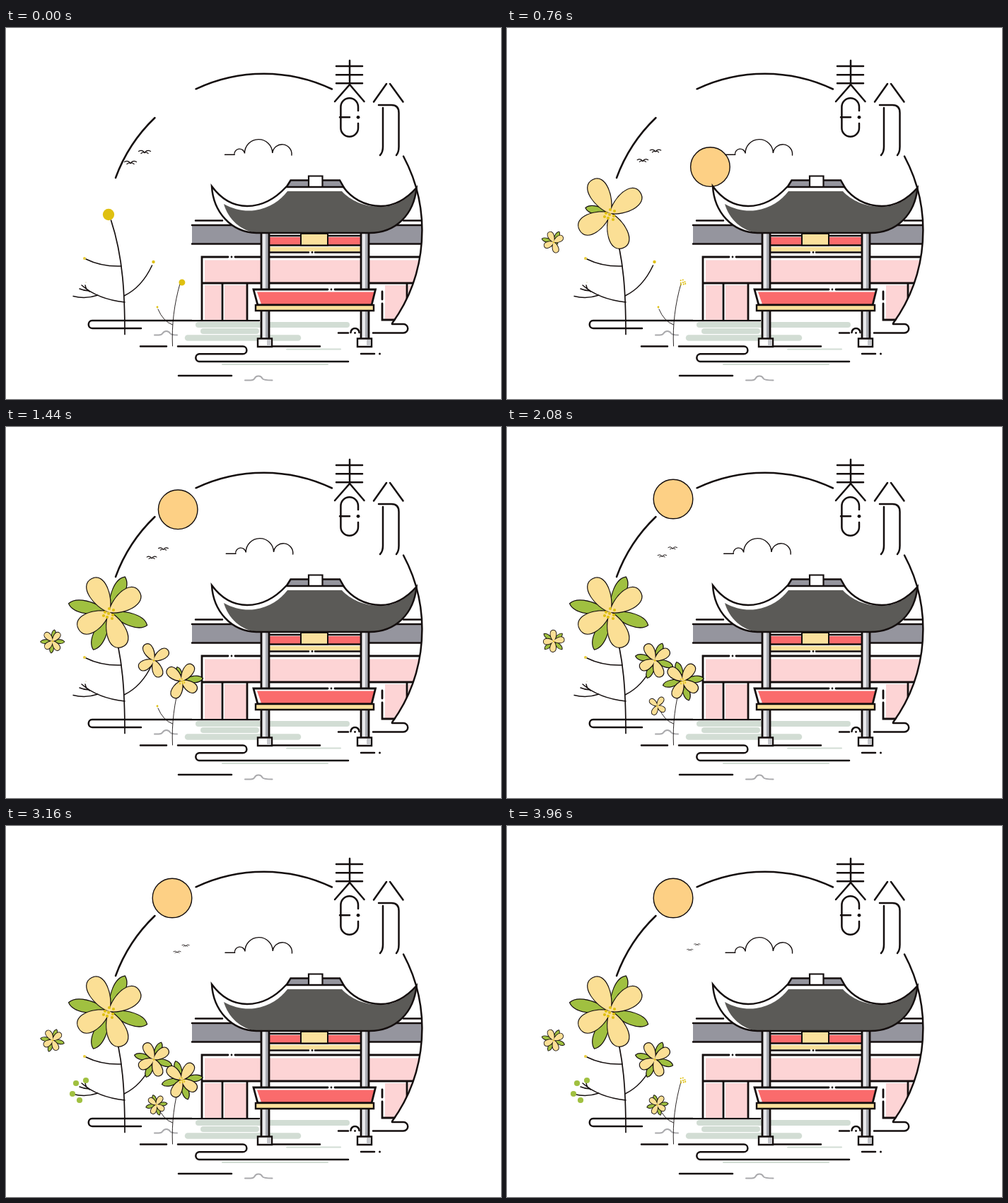
An HTML page with a canvas that plays this animation: 700x525 px, repeating every 4000 ms.

```html
<!DOCTYPE html>
<html lang="en">
<head>
<meta charset="utf-8">
<title>Spring pavilion</title>
<style>
html, body { margin: 0; width: 100%; height: 100%; overflow: hidden; background: #fff; }
canvas { display: block; width: 700px; height: 525px; }
</style>
</head>
<body>
<canvas id="stage" width="700" height="525"></canvas>
<script>
const ctx = document.getElementById('stage').getContext('2d');
const LOOP = 4000;
const INK = '#140e0e', PETAL = '#fbdf95', LEAF = '#a0c040', POLLEN = '#dfc010';
const SUN = '#fdd085', PINK = '#fdd4d5', RED = '#fa6b6c', CREAM = '#fbe19c';
const WALL = '#95959e', ROOF = '#5b5a57', MOSS = '#d2ddd4';
const RING = { x: 364.5, y: 288.5, r: 224 };
const BOLD = 2.8;

const clamp = v => Math.max(0, Math.min(1, v));
const mix = (a, b, p) => a + (b - a) * p;
const backOut = p => 1 + 2 * (p - 1) ** 3 + (p - 1) ** 2;
const pop = (t, start, dur) => t <= start ? 0 : backOut(clamp((t - start) / dur));
const sway = t => -Math.sin(t / 1600 * 2 * Math.PI);

function line(d, width = 2.5, color = INK) {
  ctx.lineWidth = width;
  ctx.strokeStyle = color;
  ctx.stroke(new Path2D(d));
}
function fill(d, color) {
  ctx.fillStyle = color;
  ctx.fill(new Path2D(d));
}
function shape(d, color, width = 2.5) {
  fill(d, color);
  line(d, width);
}
function rect(x, y, w, h, color) {
  ctx.fillStyle = color;
  ctx.fillRect(x, y, w, h);
}
function dot(x, y, r, color) {
  if (r <= 0) return;
  ctx.fillStyle = color;
  ctx.beginPath();
  ctx.arc(x, y, r, 0, 7);
  ctx.fill();
}
function ringArc(x1, y1, x2, y2) {
  line(`M${x1} ${y1}A${RING.r} ${RING.r} 0 0 1 ${x2} ${y2}`);
}

// Sky
function cloud(t) {
  ctx.save();
  ctx.translate(3 * sway(t), 0);
  line('M309.5 179.3H323A7 7 0 0 1 337.5 177.5A19 19 0 0 1 376.8 177A13 13 0 0 1 404 180', 1.4);
  ctx.restore();
}
function sun(t) {
  const u = 1 - clamp(t / 1720), w = 0.18;
  const left = (u < w ? u * u / (2 * w) : u - w / 2) / (1 - w / 2);
  ctx.beginPath();
  ctx.arc(235 + 102 * left, 102 + 184 * left, 27.8, 0, 7);
  ctx.fillStyle = SUN;
  ctx.fill();
  ctx.lineWidth = 1.4;
  ctx.strokeStyle = INK;
  ctx.stroke();
}
function birds(t) {
  const p = t / LOOP, s = mix(1, 0.5, p);
  ctx.save();
  ctx.translate(mix(196, 269.5, p), mix(175.5, 167.5, p));
  ctx.scale(s, s);
  for (const [x, y] of [[0, 0], [-20, 15]]) {
    ctx.save();
    ctx.translate(x, y);
    line('M-8.5 -1Q-3.5 -4 0 1Q3.5 -4 8.5 -1M-5 2Q-2 -0.5 0 1Q2 -0.5 5 2', 1.3);
    ctx.restore();
  }
  ctx.restore();
}

function title() {
  line('M467 54H504M467 66.3H504M467 78.3H504M486 46V80L465 104M486 80L506.5 104');
  line('M498 117V111.5A12.3 12.3 0 0 0 473.4 111.5V141.5A12.3 12.3 0 0 0 498 141.5V135M472 126.3H486');
  dot(498, 126.3, 2.4, INK);
  line('M538 79L520 104.5M543 79L561.5 104.5M527 109H545Q555.5 109 555.5 120V168Q555.5 176 552 180M533 113V168Q533 176 529 180');
}

// Pavilion
const roofPath = 'M291 224C305 243 322 252 341 252C366 252 384 238 396 225H477C488 240 506 252 530 252C552 252 568 240 580.5 226C577 263 552 290 514 290H354C318 289 293 260 291 224Z';
const roofTiles = 'M308 249C322 257 338 260 352 258C373 255 388 244 398 231H475C487 244 506 253 530 253C552 253 568 241 580.5 226C577 263 552 290 514 290H356C332 288 314 270 308 249Z';

function walls() {
  ctx.save();
  ctx.beginPath();
  ctx.arc(RING.x, RING.y, RING.r, 0, 7);
  ctx.clip();
  rect(263, 272, 325, 141, '#fff');
  line('M268 272.5H306M562 272.5H590');
  rect(263, 279, 325, 26, WALL);
  line('M263 279H590M263 305.5H590');

  rect(366, 290, 142, 32, '#fff');
  rect(373, 296, 130, 11, RED);
  line('M366 294H508M366 307.5H508');
  rect(373, 310, 130, 6, CREAM);
  line('M366 317.5H428M437 317.5H508');
  dot(433, 317.5, 1.4, INK);
  shape('M417 291H455V307.5H417Z', CREAM, 2);

  rect(281, 328.5, 307, 32, PINK);
  rect(281, 364, 23, 49, PINK);
  rect(309, 364, 31, 49, PINK);
  rect(536, 364, 30, 49, PINK);
  rect(569, 364, 20, 49, PINK);
  line('M277 413V324H314M324 324H590M277 361H590M306 361V413M341 361V413M567 361V413M532 373V384M532 390V413H552', BOLD);
  dot(319, 324, 1.4, INK);
  ctx.restore();
}
function roof() {
  shape('M396 226L402.5 215.5H472L478 226Z', WALL);
  shape('M428 209.5H447.5V225H428Z', '#fff', 2.2);
  fill(roofPath, '#fff');
  fill(roofTiles, ROOF);
  line(roofPath);
}
function post(x) {
  rect(x, 290, 11, 150, '#e9e9ec');
  rect(x + 6, 290, 4, 150, '#a9abb2');
  line(`M${x} 291V440M${x + 11} 291V440`, BOLD);
  shape(`M${x - 5} 439.5H${x + 15}V451H${x - 5}Z`, '#fff', 2.4);
  rect(x + 8, 441, 5, 9, '#c5c6ca');
}
function bench() {
  fill('M350 370H522.5L517 392H356Z', '#fff');
  fill('M355 373.5H521L516 391H361Z', RED);
  line('M455 370H350L356 392H517L522.5 370H465', BOLD);
  dot(460, 370, 1.4, INK);
  shape('M353 392H520V400H353Z', CREAM, 2.4);
}

function ground() {
  line('M272 420H482', 8, MOSS);
  line('M279 429H354', 8, MOSS);
  line('M257 438.5H413', 8.5, MOSS);
  line('M397 454.5H473M306 476H455', 2, MOSS);
  line('M191 425H122C115 425 115 414 122 414H358');
  line('M546 419H562A6 6 0 0 1 562 431.5H519M470 431.5H484M487.5 431A6 6 0 0 1 499.5 431M503 431.5H513');
  dot(493.5, 431.5, 1.4, INK);
  line('M190 450.5H227M376 450.5H444M243 450.5H335A5.4 5.4 0 0 1 335 461.3H273A5.4 5.4 0 0 0 273 472H484M502 461H521M244 492H319');
  dot(528.5, 461, 1.5, INK);
  line('M210 434.5H216Q220 434.5 221.5 432A6 6 0 0 1 232 432Q233.5 434.5 242 434.5M338 498.5H346Q350 498.5 351.5 496A6 6 0 0 1 362.5 496Q364 498.5 376.5 498.5', 2, '#a9a9ac');
}

// Plants
function stems() {
  line('M168 433.5C168 380 166 325 148.5 272', 1.7);
  line('M163 337Q135 338 113 327M167 379Q192 367 206.5 336M168 388Q130 384 107 364M95 379.5Q113 384 130 378M104 369Q111 372 118 372M112 364Q113 370 118 373', 1.5);
  line('M235.5 450C234 420 238 390 246 362M235.5 420Q222 415 215 398', 0.9);
  dot(111, 326, 2, '#e8cc3c');
  dot(113, 360, 1, '#ece9d0');
  dot(208.5, 331, 2.2, POLLEN);
  dot(214, 395, 1.4, POLLEN);
}
function berries(t) {
  const spots = [[113, 360], [94, 379], [104, 388], [99, 364]];
  spots.forEach(([x, y], i) => dot(x, y, 4.1 * clamp((t - 2320 - i * 60) / 420), LEAF));
}

// Blades: angle in degrees and length, in order of growth
const petals = [[151, 49], [242, 53], [325, 51], [70, 52]];
const leaves = [[192, 58], [294, 54], [19, 56], [113, 57]];
const pollen = [[-6, 0], [0, -5], [6, -3], [-1, 2], [5, 4], [-8, 5], [-3, 7], [4, 9]];

function blades(list, outline, color, start, gap, t, size) {
  const path = new Path2D();
  list.forEach(([angle, len], i) => {
    const g = pop(t, start + i * gap, 200);
    if (g) path.addPath(new Path2D(outline(len)), new DOMMatrix().rotate(angle).scale(g));
  });
  ctx.lineWidth = (size < 0.4 ? 1.8 : 2.4) / size;
  ctx.strokeStyle = INK;
  ctx.stroke(path);
  ctx.fillStyle = color;
  ctx.fill(path);
}
const petalShape = l => `M0 0C${l * 0.3} -15 ${l} -21 ${l} 0C${l} 21 ${l * 0.3} 15 0 0Z`;
const leafShape = l => `M0 0C${l * 0.4} -10 ${l * 0.85} -12 ${l} 0C${l * 0.85} 12 ${l * 0.4} 10 0 0Z`;

function flower(t, f) {
  ctx.save();
  ctx.translate(f.x, f.y);
  ctx.rotate(f.turn || 0);
  ctx.scale(f.flip ? -f.size : f.size, f.size);
  if (t < (f.end || LOOP)) {
    blades(leaves, leafShape, LEAF, f.start + 480, 120, t, f.size);
    blades(petals, petalShape, PETAL, f.start, 90, t, f.size);
  }
  if (f.bud) {
    const open = clamp(t / 200);
    dot(-1, 2, f.bud / f.size * (1 - open), POLLEN);
    for (const [x, y] of pollen) dot(x, y, 2.1 * open, POLLEN);
  } else if (t > f.start) {
    dot(0, 1, 1.8 / Math.sqrt(f.size), POLLEN);
  }
  ctx.restore();
}

function draw(t) {
  rect(0, 0, 700, 525, '#fff');
  ctx.lineCap = 'round';
  ctx.lineJoin = 'miter';

  ringArc(155, 212, 210.5, 127);
  ringArc(268.5, 86.3, 461, 86.5);
  sun(t);
  cloud(t);
  birds(t);
  title();
  ground();
  walls();
  ringArc(562, 181.5, 546, 418);
  post(361);
  post(502);
  roof();
  bench();

  stems();
  berries(t);
  if (t > 0) flower(t, { x: 66, y: 303, size: 0.29, start: 20, turn: -sway(t) * 0.46 });
  flower(t, { x: 146, y: 262, size: 1, start: 242, bud: 8.2 });
  flower(t, { x: 209, y: 330, size: 0.47, start: 960 });
  flower(t, { x: 248.5, y: 359, size: 0.5, start: 790, bud: 4.5, flip: true, turn: 0.1, end: 3680 });
  flower(t, { x: 212.5, y: 394.5, size: 0.26, start: 1600, flip: true, turn: 0.1 });
}

const begin = performance.now();
function tick() {
  draw((performance.now() - begin) % LOOP);
  requestAnimationFrame(tick);
}
tick();
</script>
</body>
</html>
```
